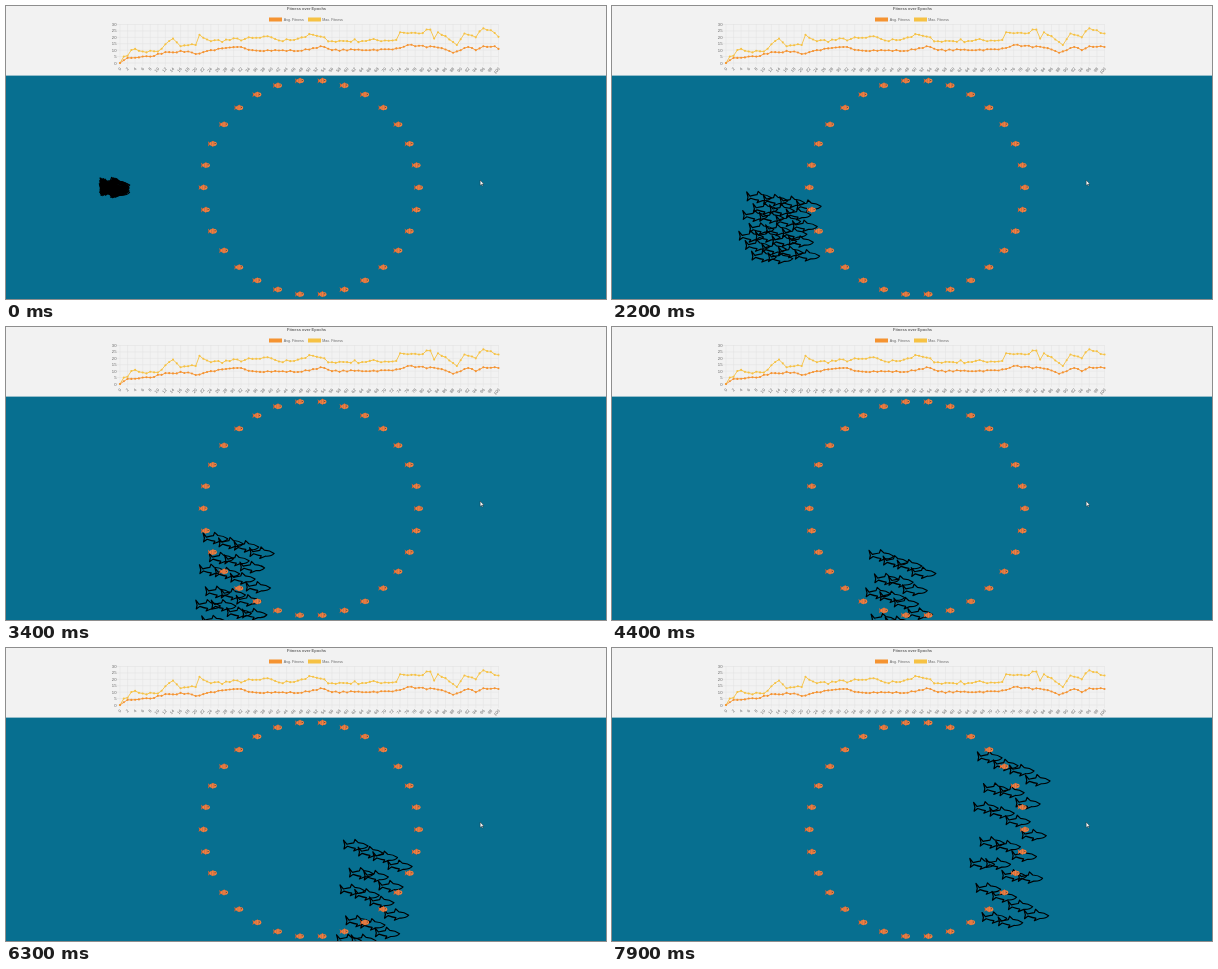
Animation, 600 px wide and 293 px high, one loop 8000 ms. Source, as an HTML page:

```html
<!DOCTYPE html>
<html lang="en">
<meta charset="utf-8">
<title>Fitness over Epochs</title>
<style>
  html, body { margin: 0; width: 100%; height: 100%; overflow: hidden; background: #076f90; }
  svg { display: block; }
  text { font: 3.65px "Liberation Sans", Arial, sans-serif; fill: #666; }
  .title { font-size: 4px; font-weight: bold; }
  .axis { font-size: 4.2px; text-anchor: end; }
</style>
<svg width="600" height="293" viewBox="0 0 600 293">
  <defs>
    <path id="shark" fill="none" stroke="#000" stroke-width="1.2" stroke-linejoin="round"
      d="M12.3 .8C9-1.6 6-2.4 2.5-2.5L-.8-5.6-2-2.3C-5-2-7-1.4-9-.9L-12.3-5-11 0-11.8 3.8-8.3 1.2C-5 2.4-3 3-.5 3.2L-2 5.8 3.5 3.6C7 3.8 10.5 3 12.3.8Z"/>
    <g id="fish">
      <path d="M-1.5 0L-4.5-2.6-3.9 0-4.5 2.6ZM-1.6-1.6L.6-3.2 2-1.5ZM-1.2 1.6L.4 3.1 1.6 1.5Z" fill="#e2622c"/>
      <ellipse cx=".8" rx="3.6" ry="2.3" fill="#f5813f"/>
      <path d="M-.8-1.8V1.8M1.5-1.9V1.9" stroke="#a8684f" stroke-width=".6"/>
      <circle cx="2.7" cy="-.4" r=".5" fill="#333"/>
    </g>
  </defs>
  <rect width="600" height="293" fill="#076f90"/>
  <rect width="600" height="69.6" fill="#f2f2f2"/>
  <text class="title" x="300.5" y="4.3" text-anchor="middle">Fitness over Epochs</text>
  <rect x="263" y="11.5" width="13" height="4" fill="#f59331"/>
  <text x="277.8" y="14.9">Avg. Fitness</text>
  <rect x="302" y="11.5" width="13" height="4" fill="#f6c244"/>
  <text x="316.3" y="14.9">Max. Fitness</text>
  <g id="chart"></g>
  <g id="sharks"></g>
  <g id="school"></g>
  <path d="M474.2 174.2V179.4L475.4 178.3 476.2 180 477 179.6 476.2 178H477.8Z" fill="#fff" stroke="#222" stroke-width=".4"/>
</svg>
<script>
const $ = id => document.getElementById(id);

function add(parent, tag, attrs, text = '') {
  const el = document.createElementNS('http://www.w3.org/2000/svg', tag);
  for (const k in attrs) el.setAttribute(k, attrs[k]);
  el.textContent = text;
  return parent.appendChild(el);
}

let seed = 7;
const noise = size => {
  seed = seed * 16807 % 2147483647;
  return (seed / 2147483647 * 2 - 1) * size;
};

// Chart
const chart = $('chart');
const px = epoch => 114 + epoch * 3.785;
const py = value => 57 - value * 1.283;

for (let v = 0; v <= 30; v += 5) {
  add(chart, 'path', { d: `M111 ${py(v)}H${px(100)}`, stroke: '#dedede', 'stroke-width': .5 });
  add(chart, 'text', { class: 'axis', x: 110.5, y: py(v) + 1.5 }, v);
}
for (let e = 0; e <= 100; e += 2) {
  add(chart, 'path', { d: `M${px(e)} 18V60`, stroke: '#e2e2e2', 'stroke-width': .5 });
  add(chart, 'text', { class: 'axis', transform: `translate(${px(e) + 1.6} 63) rotate(-48)` }, e);
}

// Joins [epoch, value] keys and roughens the stretches between them
function curve(keys, rough) {
  return Array.from({ length: 101 }, (_, e) => {
    const k = keys.findIndex(key => key[0] >= e);
    const [x, y] = keys[k];
    if (x === e) return y;
    const [x0, y0] = keys[k - 1];
    return y0 + (y - y0) * (e - x0) / (x - x0) + noise(rough);
  });
}

function series(values, color) {
  const line = add(chart, 'path', { fill: 'none', stroke: color, 'stroke-width': .9 });
  const dots = values.map((v, i) => add(chart, 'circle', { cx: px(i), cy: py(v), r: 1.05, fill: color }));
  return last => {
    dots[100].setAttribute('cy', py(last));
    line.setAttribute('d', 'M' + values.map((v, i) => px(i) + ' ' + py(i < 100 ? v : last)).join('L'));
  };
}
const drawMax = series(curve([[0, 0], [1, 5], [4, 11], [6, 9], [10, 9], [14, 19], [16, 13], [20, 14],
  [21, 22], [24, 17], [40, 20], [43, 17], [51, 22], [56, 17], [73, 18], [74, 24], [79, 23], [82, 26],
  [83, 19], [84, 24], [89, 14], [91, 23], [94, 20], [96, 27], [100, 23]], 1.3), '#f6c244');
const drawAvg = series(curve([[0, 0], [2, 4], [8, 5], [12, 8.5], [18, 9], [20, 7], [24, 10], [32, 12.5],
  [35, 10], [48, 9.5], [53, 13], [56, 10], [72, 10.5], [76, 14], [84, 12], [88, 8], [92, 12.5],
  [94, 10], [96, 13], [100, 12.5]], .6), '#f59331');

// Ring of fish
for (let i = 0; i < 30; i++) {
  const a = i * Math.PI / 15;
  add($('school'), 'use', { href: '#fish', x: 304.8 + 107.7 * Math.cos(a), y: 181.5 + 107.3 * Math.sin(a) });
}

// Course of the shoal: time, centre x and y, half its width and height
const course = [
  [0, 108.5, 181.5, 3, 4.5],
  [1400, 135, 193, 23, 22],
  [2200, 168, 222, 30, 31],
  [3400, 229, 264, 28, 53],
  [5400, 340, 302, 24, 70],
  [7000, 384, 237, 29, 78],
  [7900, 398, 193, 29, 84]
];

// Cubic through the course, with slopes taken from the neighbours
function shoal(t) {
  const end = course.length - 1;
  const k = Math.max(course.findIndex(p => p[0] >= t) - 1, 0);
  const h = course[k + 1][0] - course[k][0], u = (t - course[k][0]) / h;
  const at = c => {
    const slope = j => {
      const a = course[Math.max(j - 1, 0)], b = course[Math.min(j + 1, end)];
      return (b[c] - a[c]) / (b[0] - a[0]) * h;
    };
    const p = course[k][c], q = course[k + 1][c], m = slope(k), n = slope(k + 1);
    return p + u * (m + u * (3 * (q - p) - 2 * m - n + u * (2 * (p - q) + m + n)));
  };
  return [1, 2, 3, 4].map(at);
}

// Each shark keeps its own place in the shoal, from -1 to 1 across and down
const count = 24;
const sharks = Array.from({ length: count }, (_, i) => ({
  el: add($('sharks'), 'use', { href: '#shark' }),
  across: 2 * ((.15 + i * .2764) % 1) - 1,
  down: 2 * i / (count - 1) - 1 + (i && noise(.06))
}));

function frame(now) {
  const t = Math.floor(now % 8000 / 100) * 100;
  const left = (1 - Math.min(t / 800, 1)) ** 4;
  drawMax(23 - 2.6 * left);
  drawAvg(12.5 - 1.5 * left);
  const [x, y, w, h] = shoal(t);
  for (const { el, across, down } of sharks) {
    el.setAttribute('transform', `translate(${x + across * w} ${y + down * h})`);
  }
  requestAnimationFrame(frame);
}
frame(performance.now());
</script>
</html>
```
